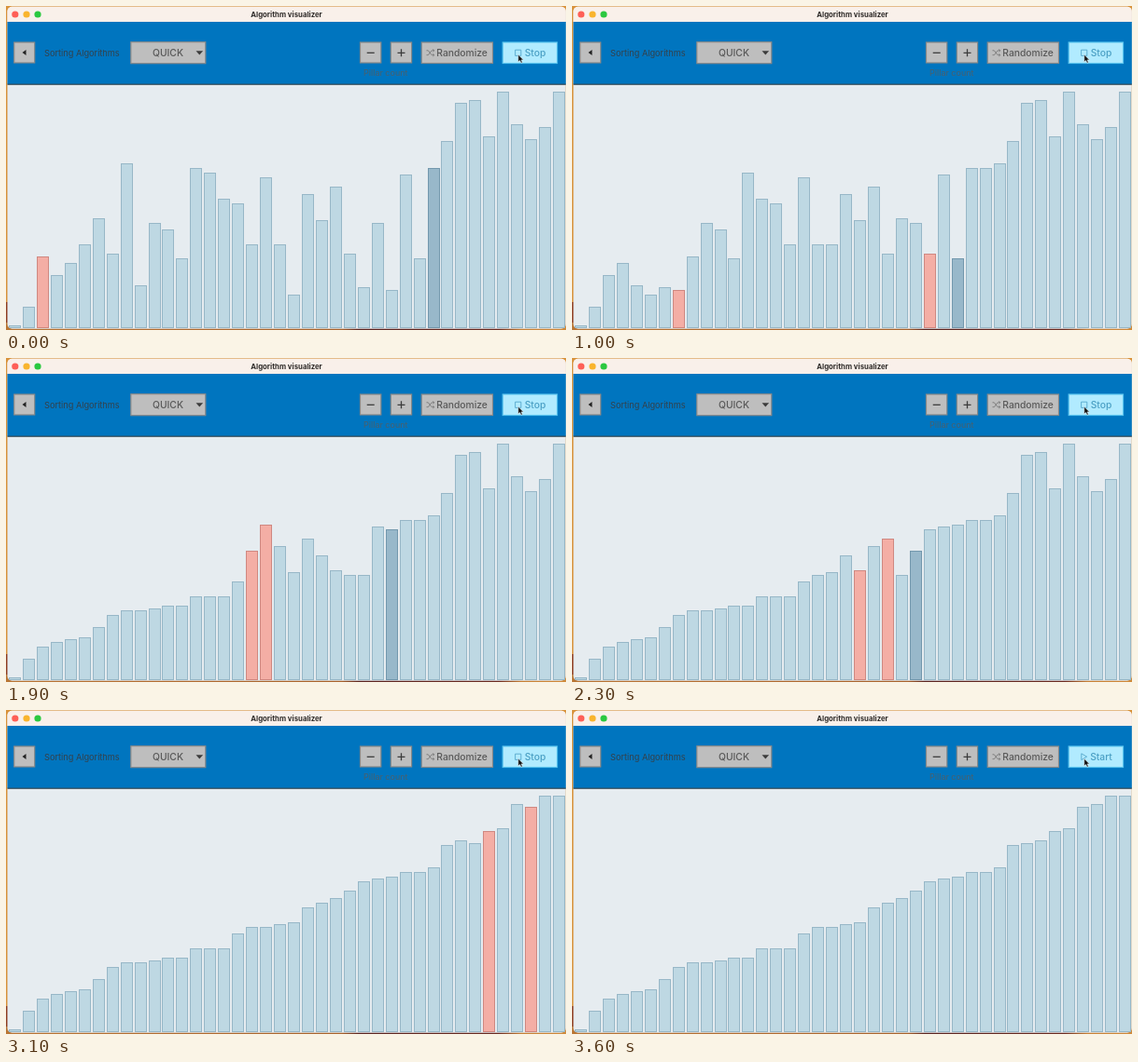
Write an HTML page with a canvas that moves like this. It is 600 px wide and 348 px high and loops after 4000 ms.

```html
<!DOCTYPE html>
<html lang="en">
<head>
<meta charset="utf-8">
<title>Algorithm visualizer</title>
<style>
  html, body { margin: 0; width: 100%; height: 100%; overflow: hidden; background: #d8923a; }
  #stage { position: relative; width: 600px; height: 348px; overflow: hidden; }
  svg, canvas { position: absolute; left: 0; top: 0; display: block; }
  text { font-family: Inter, Roboto, sans-serif; }
  .title { font-size: 7.8px; font-weight: 700; fill: #2f2c2a; }
  .label { font-size: 9.2px; fill: #33424c; }
  .hint { font-size: 9px; fill: #48606e; }
  .caption { font-size: 10.3px; font-weight: 500; fill: #585858; }
  .run { fill: #4a9fc4; }
  .box { fill: #bebebe; stroke: #868889; stroke-width: 1.2; }
  .line { fill: none; stroke: #707070; stroke-width: .8; }
  .sign { stroke: #3c3c3c; stroke-width: 1.3; fill: none; }
</style>
</head>
<body>
<div id="stage">
  <svg width="600" height="348" viewBox="0 0 600 348">
    <defs>
      <linearGradient id="desk">
        <stop offset="0" stop-color="#b87534"/>
        <stop offset=".6" stop-color="#a8622c"/>
        <stop offset=".63" stop-color="#5b2420"/>
        <stop offset=".88" stop-color="#6b2a20"/>
        <stop offset=".92" stop-color="#c67f35"/>
        <stop offset="1" stop-color="#cf8a3a"/>
      </linearGradient>
      <clipPath id="win"><rect x="1.5" y=".8" width="598.3" height="346" rx="5"/></clipPath>
    </defs>
    <rect width="600" height="348" fill="#d8923a"/>
    <rect y="318" width="3" height="30" fill="#8f3f22"/>
    <rect y="340" width="600" height="8" fill="url(#desk)"/>
    <g clip-path="url(#win)">
      <rect width="600" height="348" fill="#e6ecf0"/>
      <rect width="600" height="17" fill="#f9f0ea"/>
      <rect y="17" width="600" height="67" fill="#0075bf"/>
      <rect y="83.6" width="600" height="1.2" fill="#2f4552"/>
    </g>
    <circle cx="9.8" cy="9" r="3.6" fill="#fe5f57"/>
    <circle cx="22" cy="9" r="3.6" fill="#f9b42d"/>
    <circle cx="34" cy="9" r="3.6" fill="#2bc840"/>
    <text class="title" x="300.5" y="11.6" text-anchor="middle">Algorithm visualizer</text>

    <rect class="box" x="8.7" y="39" width="22" height="22"/>
    <path d="M21.5 47V53L17.5 50Z" fill="#222"/>
    <text class="label" x="41" y="53.7">Sorting Algorithms</text>

    <rect class="box" x="133.8" y="38.7" width="80" height="23"/>
    <text class="caption" x="173.5" y="54" text-anchor="middle">QUICK</text>
    <path d="M203.5 48.2H211.1L207.3 52.4Z" fill="#3c3c3c"/>

    <rect class="box" x="379.5" y="39" width="22.3" height="22"/>
    <path class="sign" d="M386.7 50.3H394.7"/>
    <rect class="box" x="412.3" y="39" width="22.3" height="22"/>
    <path class="sign" d="M419.5 50.3H427.5M423.5 46.3V54.3"/>
    <text class="hint" x="406.8" y="74.5" text-anchor="middle">Pillar count</text>

    <rect class="box" x="445.2" y="39" width="76.3" height="22.5"/>
    <path class="line" d="M450.5 47.8H452.3L456.2 52.7H458.6M450.5 52.7H452.3L456.2 47.8H458.6M457.4 46.5L458.9 47.8L457.4 49.1M457.4 51.4L458.9 52.7L457.4 54"/>
    <text class="caption" x="488.6" y="54" text-anchor="middle">Randomize</text>

    <rect x="532.2" y="39" width="58.3" height="22.5" fill="#b1ebff" stroke="#5cc5ee" stroke-width="1.2"/>
    <path id="icon" class="line" style="stroke:#4a9fc4"/>
    <text id="run" class="caption run" x="567" y="54" text-anchor="middle">Stop</text>
    <path d="M548.8 52.2V60L550.6 58.5L551.9 61.2L553.3 60.5L552 57.9H554.4Z" fill="#111" stroke="#f4fbff" stroke-width=".5"/>
  </svg>
  <canvas id="chart" width="600" height="348"></canvas>
</div>
<script>
  const BASE = 346;
  const tops = [
    343, 323, 269, 289, 276, 256, 228, 266, 169, 300,
    233, 240, 271, 174, 179, 207, 212, 256, 184, 256,
    310, 202, 230, 194, 266, 302, 233, 305, 181, 271,
    174, 145, 104, 101, 140, 92, 127, 143, 130, 92
  ];
  const SPLIT = 31;     // bars from here on are already larger than all before
  const FIRST = 2;      // swaps already done when the loop begins
  const LAST_TICK = 36;
  // [tick, swap index] pairs that set the pace
  const pace = [[0, 0], [6, 18], [12, 42], [14, 49], [19, 63], [27, 86], [31, 99], [36, 104]];

  const colors = {
    plain: ['#bed8e3', '#97b7c7'],
    swap: ['#f4aea5', '#cf8881'],
    pivot: ['#98b8ca', '#7398ad']
  };

  function record(start) {
    const a = start.map(y => BASE - y);
    const log = [];
    const swap = (i, j, pivot) => {
      [a[i], a[j]] = [a[j], a[i]];
      log.push({ bars: a.slice(), i, j, pivot });
    };
    const sort = (lo, hi) => {
      if (lo >= hi) return;
      let i = lo;
      for (let j = lo; j < hi; j++) {
        if (a[j] < a[hi]) swap(i++, j, hi);
      }
      swap(i, hi, hi);
      sort(lo, i - 1);
      sort(i + 1, hi);
    };
    sort(0, SPLIT - 1);
    sort(SPLIT, a.length - 1);
    log.push({ bars: a.slice(), i: -1, j: -1, pivot: -1, done: true });
    return log.slice(FIRST);
  }

  const log = record(tops);
  const ctx = document.getElementById('chart').getContext('2d');
  const icon = document.getElementById('icon');
  const run = document.getElementById('run');

  function stepAt(tick) {
    let k = 1;
    while (k < pace.length - 1 && tick > pace[k][0]) k++;
    const [t0, s0] = pace[k - 1], [t1, s1] = pace[k];
    const s = Math.round(s0 + (s1 - s0) * (tick - t0) / (t1 - t0));
    return log[Math.min(s, log.length - 1)];
  }

  function draw(step) {
    ctx.clearRect(0, 0, 600, 348);
    step.bars.forEach((h, n) => {
      const kind = n === step.i || n === step.j ? 'swap' : n === step.pivot ? 'pivot' : 'plain';
      const [fill, edge] = colors[kind];
      const x = Math.round(3 + n * 14.95);
      ctx.fillStyle = fill;
      ctx.strokeStyle = edge;
      ctx.fillRect(x, BASE - h, 13, h);
      ctx.strokeRect(x + .5, BASE - h + .5, 12, h - 1);
    });
    run.textContent = step.done ? 'Start' : 'Stop';
    icon.setAttribute('d', step.done ? 'M545.8 46.8V53.6L551.6 50.2Z' : 'M545.6 47.2H551.8V53.4H545.6Z');
  }

  let shown = -1;
  function frame() {
    const tick = Math.min(LAST_TICK, Math.floor(performance.now() % 4000 / 100));
    if (tick !== shown) draw(stepAt(shown = tick));
    requestAnimationFrame(frame);
  }
  frame();
</script>
</body>
</html>
```
